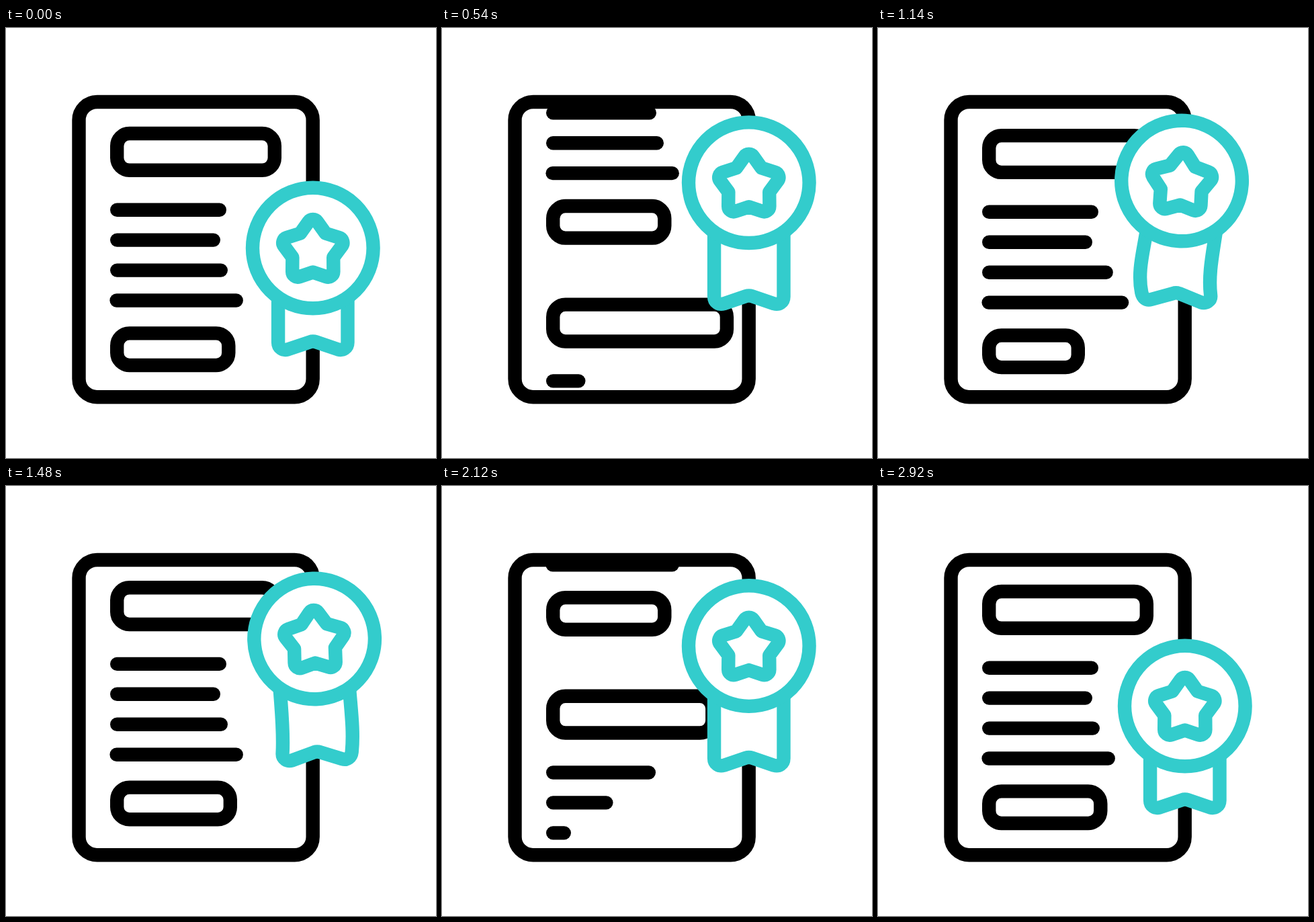
Write an HTML page that moves like this. It is 640 px wide and 640 px high and loops after 3020 ms.

```html
<!DOCTYPE html>
<html lang="en">
<head>
<meta charset="utf-8">
<title>Certificate</title>
<style>
  html, body { margin: 0; width: 100%; height: 100%; overflow: hidden; background: #fff; }
  svg { display: block; width: 100%; height: 100%; }
  .ink, .teal { stroke-width: 20.4; stroke-linecap: round; stroke-linejoin: round; }
  .ink { stroke: #000; fill: none; }
  .teal { stroke: #3cc; fill: #fff; }
  #ribbon { stroke-linecap: butt; }
</style>
</head>
<body>
<svg viewBox="0 0 640 640">
  <clipPath id="inside"><rect x="108.5" y="110" width="348" height="439" rx="27"/></clipPath>
  <g id="rows" class="ink" clip-path="url(#inside)"></g>
  <rect class="ink" x="108.5" y="110" width="348.2" height="439.2" rx="27"/>
  <path id="ribbon" class="teal"/>
  <g id="badge" class="teal">
    <circle r="89.8"/>
    <path id="star"/>
  </g>
</svg>
<script>
const LOOP = 3020, LAST = 2920;
const CYCLE = 1400, PITCH = 444;
const STROKE = 20.4, LEFT = 165.2, CX = 456.8;

const $ = id => document.getElementById(id);
const set = (el, attrs) => { for (const k in attrs) el.setAttribute(k, attrs[k]); };

// Each part: top of its centre line, final outer width, start of growth, height for boxes
const parts = [
  { y: 157, w: 255, start: 160, h: 54.8 },
  { y: 270.7, w: 173, start: 440 },
  { y: 315.6, w: 164, start: 540 },
  { y: 360.6, w: 175, start: 680 },
  { y: 405.5, w: 198.5, start: 780, x: 164.6 },
  { y: 454.4, w: 186.5, start: 920, h: 47.6 }
];

const rise = [[0, 0], [600, 1], [2000, 1], [2600, 0]];
const swing = [[600, 0], [800, -1], [1000, 1], [1200, -1], [1400, 1], [1600, -1], [1800, 1], [2000, 0]];
const scroll = [[0, 0], [1200, PITCH], [CYCLE, PITCH], [CYCLE + 1200, 2 * PITCH]];

// Value at time t, eased in and out between keys
function track(t, keys) {
  if (t <= keys[0][0]) return keys[0][1];
  for (let i = 1; i < keys.length; i++) {
    const [t0, a] = keys[i - 1], [t1, b] = keys[i];
    if (t < t1) {
      const u = (t - t0) / (t1 - t0);
      return a + (b - a) * u * u * (3 - 2 * u);
    }
  }
  return keys[keys.length - 1][1];
}

function growth({ w, start, h }) {
  return [[start, h ? 72 : 32], [start + 400, w + 25.5], [start + 600, w]];
}

const groups = [0, 1, 2].map(() => {
  const g = document.createElementNS('http://www.w3.org/2000/svg', 'g');
  $('rows').append(g);
  const items = parts.map(p => {
    const el = document.createElementNS('http://www.w3.org/2000/svg', p.h ? 'rect' : 'line');
    const x = p.x || LEFT;
    set(el, p.h ? { x, y: p.y, height: p.h, rx: 18.5 } : { x1: x, y1: p.y, y2: p.y });
    g.append(el);
    return { el, x, box: p.h, keys: growth(p) };
  });
  return { g, items };
});

function drawRows(t) {
  const shift = track(t, scroll);
  groups.forEach(({ g, items }, k) => {
    set(g, { transform: `translate(0 ${k * PITCH - shift})` });
    const local = k ? t - (k - 1) * CYCLE : Infinity;
    for (const { el, x, box, keys } of items) {
      const len = track(local, keys) - STROKE;
      set(el, box ? { width: len } : { x2: x + len });
    }
  });
}

function starPath() {
  const at = (r, deg) => {
    const a = deg * Math.PI / 180;
    return `${(r * Math.sin(a)).toFixed(2)} ${(4 - r * Math.cos(a)).toFixed(2)}`;
  };
  let d = '';
  for (let a = 0; a < 360; a += 72) {
    d += `${a ? 'L' : 'M'}${at(43.6, a - 8.6)}A8 8 0 0 1 ${at(43.6, a + 8.6)}L${at(32, a + 36)}`;
  }
  return d + 'Z';
}

// One edge of the ribbon; side is -1 for left, 1 for right
function edge(side, sway, drift, top, bottom) {
  const leads = side * drift > 0;
  const x0 = CX + side * 51.7;
  const y = bottom - (leads ? 0.32 * Math.abs(drift) : 0);
  const x = x0 + drift * (leads ? 0.92 : 0.96);
  const bend = x0 + drift * (leads ? 1.4 : 1.25);
  return {
    start: `${x0 + sway} ${top}`,
    c1: `${x0 + drift * 0.66} ${top + (y - top) / 3}`,
    c2: `${bend} ${top + (y - top) * 2 / 3}`,
    end: `${x} ${y}`,
    k1: `${x + (x - bend) / 4} ${y + 8}`,
    k2: `${x - side * 7} ${y + 12.5}`,
    foot: `${x - side * 14.3} ${y + 10.4}`
  };
}

function drawBadge(t) {
  const up = track(t, rise), s = track(t, swing);
  const cy = 327.5 - 100 * up, bottom = 468 - 70 * up;
  const sway = 8.2 * s, drift = 24 * s;
  const l = edge(-1, sway, drift, cy + 70, bottom);
  const r = edge(1, sway, drift, cy + 70, bottom);
  const nx = CX + drift * 0.95, ny = bottom - 0.7 - 0.16 * Math.abs(drift);
  set($('ribbon'), {
    d: `M${l.start}C${l.c1} ${l.c2} ${l.end}C${l.k1} ${l.k2} ${l.foot}` +
       `L${nx - 4.5} ${ny}Q${nx} ${ny - 1.5} ${nx + 4.5} ${ny}` +
       `L${r.foot}C${r.k2} ${r.k1} ${r.end}C${r.c2} ${r.c1} ${r.start}`
  });
  set($('badge'), { transform: `translate(${CX + sway} ${cy}) rotate(${-6 * s})` });
}

set($('star'), { d: starPath() });

const begin = performance.now();
function frame(now) {
  const t = Math.min(Math.max(0, now - begin) % LOOP, LAST);
  drawRows(t);
  drawBadge(t);
  requestAnimationFrame(frame);
}
frame(begin);
</script>
</body>
</html>
```
